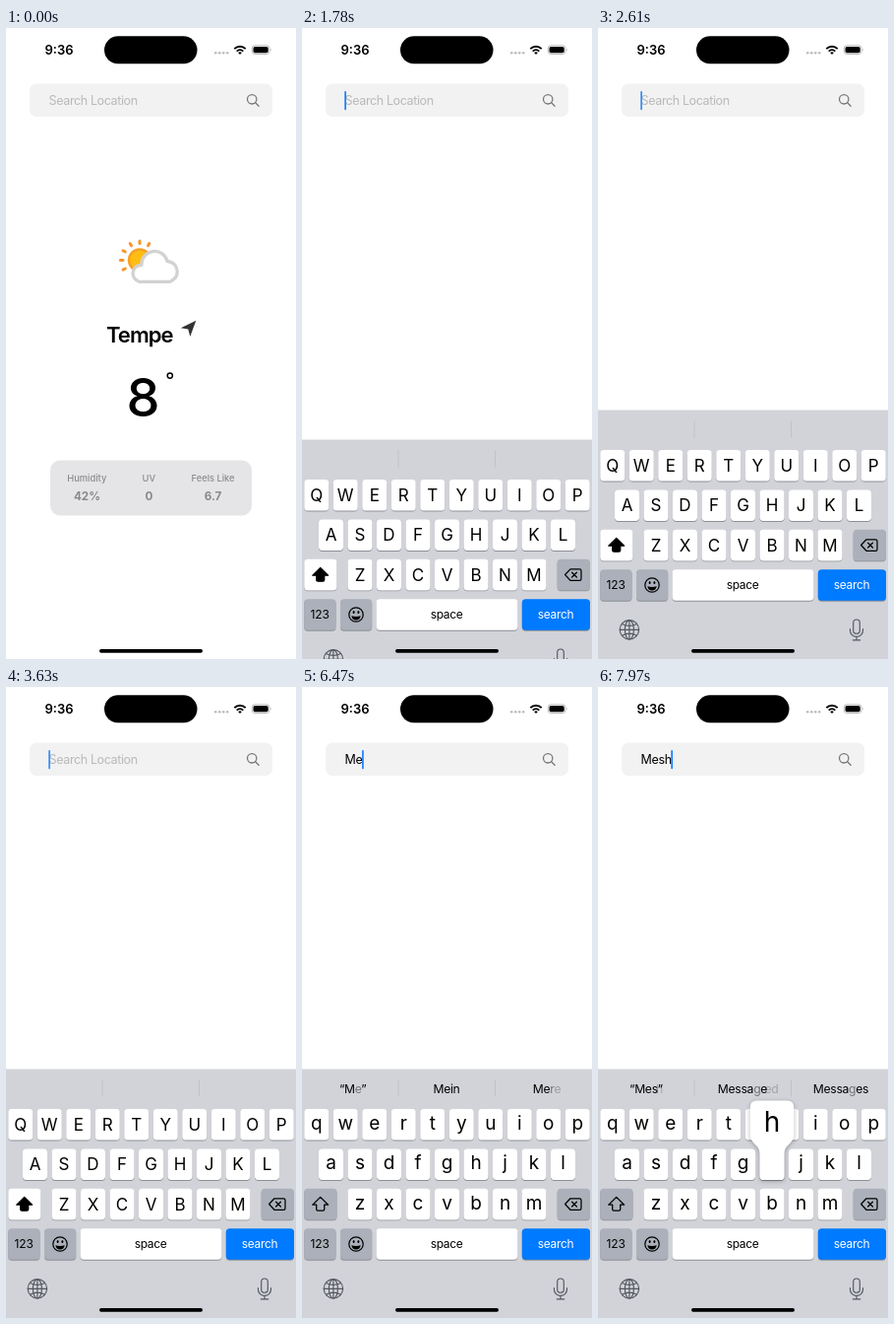
Recreate the animation shown at these times as an HTML page. Size 295 by 640 pixels, loop 8000 ms.

```html
<!DOCTYPE html>
<html lang="en">
<head>
<meta charset="utf-8">
<title>Weather search</title>
<style>
  html, body { margin: 0; width: 100%; height: 100%; overflow: hidden; background: #fff; }
  svg { display: block; width: 295px; height: 640px; font-family: Inter, Roboto, sans-serif; }
  text { white-space: pre; }
  .mid { text-anchor: middle; }
  .field { font-size: 12.5px; letter-spacing: -.38px; }
  .label { font-size: 9.3px; font-weight: 500; fill: #8b8b8e; }
  .value { font-size: 11.7px; font-weight: 700; fill: #89898c; }
  .small { font-size: 12px; letter-spacing: -.35px; }
  .word { font-size: 12.2px; letter-spacing: -.3px; }
  .line { fill: none; stroke: #000; stroke-linecap: round; stroke-linejoin: round; }
  .util { stroke: #55585e; stroke-width: 1.15; }
  #balloon path { filter: drop-shadow(0 1px 2px rgba(0,0,0,.3)); }
</style>
</head>
<body>
<svg viewBox="0 0 295 640">
  <rect width="295" height="640" fill="#fff"/>

  <!-- status bar -->
  <text class="mid" x="54" y="26.8" font-size="13" font-weight="600">9:36</text>
  <rect x="100" y="8.3" width="94.5" height="28" rx="14"/>
  <g fill="#bcbcbe">
    <circle cx="213.2" cy="25.2" r="1.3"/><circle cx="217.2" cy="25.2" r="1.3"/>
    <circle cx="221.2" cy="25.2" r="1.3"/><circle cx="225.2" cy="25.2" r="1.3"/>
  </g>
  <g class="line" stroke-width="1.9" style="stroke-linecap:butt">
    <path d="M232.3 21.1a8.2 8.2 0 0 1 11.4 0M234.7 23.6a4.8 4.8 0 0 1 6.6 0"/>
  </g>
  <path d="M236.2 25.1a2.6 2.6 0 0 1 3.6 0l-1.8 1.9z"/>
  <rect x="250.3" y="17.8" width="17.6" height="8.6" rx="2.7" fill="none" stroke="#a5a5a5" stroke-width=".8"/>
  <rect x="251.5" y="19" width="15.2" height="6.2" rx="1.7"/>
  <path d="M269 20.6q1.4 1.5 0 3z" fill="#a5a5a5"/>

  <!-- search field -->
  <rect x="24" y="56.5" width="247" height="33.5" rx="7" fill="#f2f2f2"/>
  <text class="field" id="hint" x="43.6" y="78.3" fill="#b9b9bc">Search Location</text>
  <text class="field" id="typed" x="43.6" y="78.3"></text>
  <rect id="caret" y="64" width="1.6" height="19.3" rx=".8" fill="#067aff"/>
  <g class="line" style="stroke:#77777a" stroke-width="1.3">
    <circle cx="250.2" cy="72.3" r="4.7"/><path d="M253.7 75.8l3.4 3.5"/>
  </g>

  <!-- current weather -->
  <g id="weather">
    <g id="rays" class="line" style="stroke:#f8952b" stroke-width="3"></g>
    <circle cx="136" cy="235.5" r="11" fill="#ffbd14" stroke="#f8a024" stroke-width="2.4"/>
    <path d="M135.5 257.3A8.65 8.65 0 0 1 138 240.3A13.2 13.2 0 0 1 164 236.5A10.6 10.6 0 0 1 166.5 257.3Z"
      fill="#fff" stroke="#d2d2d3" stroke-width="3.3" stroke-linejoin="round"/>
    <text x="102" y="318.7" font-size="22" font-weight="600" letter-spacing="-.95">Tempe</text>
    <path d="M193.3 296.8L177.8 304.2l7.5 1.3 2 7.4z" fill="#333336"/>
    <text class="mid" x="139.5" y="394.3" font-size="54" font-weight="500">8</text>
    <circle cx="166.8" cy="352.6" r="2.6" fill="none" stroke="#000" stroke-width="1.5"/>
    <rect x="45" y="438.5" width="205" height="56" rx="10" fill="#e5e5e7"/>
    <g class="mid">
      <text class="label" x="82.3" y="460">Humidity</text>
      <text class="label" x="145.3" y="460">UV</text>
      <text class="label" x="210.6" y="460">Feels Like</text>
      <text class="value" x="82.5" y="479.3">42%</text>
      <text class="value" x="145.4" y="479.3">0</text>
      <text class="value" x="210.6" y="479.3">6.7</text>
    </g>
  </g>

  <!-- keyboard -->
  <g id="board">
    <rect y="387.5" width="295" height="320" fill="#d1d3d9"/>
    <path d="M98 398.5v17M196.5 398.5v17" stroke="#bfc1c7" stroke-width=".9"/>
    <g id="words"></g>
    <g id="keys"></g>
    <path id="shift" class="line" stroke-width="1.3"
      d="M18.7 517.4L26.6 525.2H22.7V529.8Q22.7 531.2 21.3 531.2H16.1Q14.7 531.2 14.7 529.8V525.2H10.8Z"/>
    <g class="line" stroke-width="1.25">
      <path d="M273 518.8H282.4Q284 518.8 284 520.4V528.7Q284 530.3 282.4 530.3H273L267.6 524.5Z"/>
      <path d="M274.6 522.2l4.8 4.8M279.4 522.2l-4.8 4.8"/>
      <circle cx="55" cy="565" r="7.2"/>
    </g>
    <path d="M50.3 566.2Q55 567.6 59.7 566.2Q59 570.4 55 570.4Q51 570.4 50.3 566.2Z"/>
    <ellipse cx="52.6" cy="562.6" rx="1" ry="1.5"/><ellipse cx="57.4" cy="562.6" rx="1" ry="1.5"/>
    <g class="mid">
      <text class="small" x="18.2" y="569.3" style="letter-spacing:0">123</text>
      <text class="small" x="147" y="568.6">space</text>
      <text class="small" x="258" y="568.6" fill="#fff">search</text>
    </g>
    <g class="line util">
      <circle cx="31.9" cy="610.3" r="9.7"/><ellipse cx="31.9" cy="610.3" rx="4.5" ry="9.7"/>
      <path d="M31.9 600.6v19.4M22.2 610.3h19.4M24.5 604.4q7.4 4 14.8 0M24.5 616.2q7.4 -4 14.8 0"/>
      <rect x="259.7" y="600" width="6.6" height="14.2" rx="3.3"/>
      <path d="M256.5 609.5v1.8a6.5 6.1 0 0 0 13 0v-1.8M263 617.5v3.2M259.3 620.8h7.4"/>
    </g>
    <g id="balloon"><path fill="#fff"/><text class="mid" font-size="28"></text></g>
  </g>
  <rect x="95" y="630" width="105" height="3.7" rx="1.85"/>
</svg>

<script>
const LOOP = 8000;
const PITCH = 29.5, KEY_W = 25, KEY_H = 31.6, TOP = 428, ROW = 40.4;
const $ = id => document.getElementById(id);

function add(parent, tag, attrs, text = '') {
  const el = document.createElementNS('http://www.w3.org/2000/svg', tag);
  for (const k in attrs) el.setAttribute(k, attrs[k]);
  el.textContent = text;
  parent.appendChild(el);
  return el;
}

function cap(x, y, w, fill) {
  const box = { x, width: w, height: KEY_H, rx: 3.7 };
  add($('keys'), 'rect', { ...box, y: y + 0.9, fill: '#8d9095' });
  return add($('keys'), 'rect', { ...box, y, fill });
}

// Sun rays
for (let a = 150; a <= 300; a += 30) {
  const r = a * Math.PI / 180, c = Math.cos(r), s = Math.sin(r);
  add($('rays'), 'path', {
    d: `M${136 + 17 * c} ${235.5 + 17 * s}L${136 + 19.6 * c} ${235.5 + 19.6 * s}`
  });
}

// Letter keys
const letters = {};
['qwertyuiop', 'asdfghjkl', 'zxcvbnm'].forEach((row, r) => {
  [...row].forEach((ch, i) => {
    const x = 2.25 + [0, 0.5, 1.5][r] * PITCH + i * PITCH, y = TOP + r * ROW;
    cap(x, y, KEY_W, '#fff');
    const cx = x + KEY_W / 2;
    letters[ch] = { cx, y, el: add($('keys'), 'text', { x: cx, class: 'mid' }) };
  });
});

// Function keys
const GREY = '#abb0ba', y3 = TOP + 2 * ROW, y4 = TOP + 3 * ROW;
const shiftKey = cap(2.25, y3, 33.2, GREY);
cap(259.7, y3, 33.2, GREY);
cap(2.25, y4, 32.2, GREY);
cap(39, y4, 32.2, GREY);
cap(75.5, y4, 144, '#fff');
cap(223.8, y4, 69.2, '#007aff');

const wordEls = [49, 147, 247].map(x => add($('words'), 'text', { x, y: 411.5, class: 'word mid' }));
const ghosts = [[59, 'h'], [169.5, 'ed']].map(([x, s]) =>
  add($('words'), 'text', { x, y: 411.5, class: 'word', opacity: 0.22 }, s));

// Parts between ~ marks fade in
const entries = [
  { at: 0, text: '', words: ['', '', ''] },
  { at: 5630, text: 'M', words: ['~“M”~', '~Mein~', '~Me~'] },
  { at: 6470, text: 'Me', words: ['“M~e~”', 'Mein', 'Me~r~~e~'], slide: [2.6, 0, 2] },
  { at: 6940, text: 'Mes', words: ['“Me~s~”', 'Me~ssage~', 'Me~ssages~'] },
  { at: 7970, text: 'Mesh', words: ['“Mes”', 'Messa~g~e', 'Messa~g~es'] }
];
const presses = [['m', 5400, 5630], ['e', 6360, 6470], ['s', 6830, 7050], ['h', 7860, LOOP]];
const riseTicks = [1570, 1680, 1780, 1880, 2000, 2130, 2250];

// Critically damped spring, sampled on the ticks
function boardOffset(t) {
  const tick = riseTicks.filter(k => k <= t).pop();
  if (!tick) return 260;
  if (tick === 2250) return 0;
  const x = 0.0161 * (tick - 1552);
  return 252.5 * (1 + x) * Math.exp(-x);
}

function caretAlpha(t) {
  if (t < 1570) return 0;
  if (t < 2130 || t >= 5400) return 1;
  const p = (t - 2130) % 1020;
  if (p < 120) return 0.5;
  if (p < 360) return 0;
  return p < 480 ? 0.5 : 0.88;
}

function setWord(el, mark, alpha, dx) {
  el.textContent = '';
  mark.split('~').forEach((part, i) => {
    if (!part) return;
    const a = i % 2 ? Math.max(0, alpha - (i > 2 && alpha < 1 ? 0.2 : 0)) : 1;
    add(el, 'tspan', { 'fill-opacity': a }, part);
  });
  el.setAttribute('transform', `translate(${dx} 0)`);
}

function balloonPath(cx, y) {
  return `M${cx - 22.3} ${y - 42}q0 -7 7 -7h30.6q7 0 7 7v28c0 9 -9.8 9 -9.8 19` +
    `v22.9q0 3.7 -3.7 3.7h-17.6q-3.7 0 -3.7 -3.7v-22.9c0 -10 -9.8 -10 -9.8 -19z`;
}

let lastKey = '';

function draw(t) {
  const entry = entries.filter(e => e.at <= t).pop();
  const press = presses.find(p => t >= p[1] && t < p[2]);
  const step = Math.floor((t - entry.at) / 110);
  $('board').setAttribute('transform', `translate(0 ${boardOffset(t)})`);
  $('caret').setAttribute('opacity', caretAlpha(t));

  const key = entry.text + '|' + (press ? press[0] : '') + '|' + Math.min(step, 4) + '|' + (t < 1570);
  if (key === lastKey) return;
  lastKey = key;

  const upper = !entry.text;
  const label = ch => upper ? ch.toUpperCase() : ch;
  $('weather').style.display = t < 1570 ? '' : 'none';
  $('hint').style.display = upper ? '' : 'none';
  $('typed').textContent = entry.text;
  $('caret').setAttribute('x', upper ? 43.3 : 43.3 + $('typed').getComputedTextLength());

  for (const ch in letters) {
    const k = letters[ch];
    k.el.textContent = press && press[0] === ch ? '' : label(ch);
    k.el.setAttribute('font-size', upper ? 17 : 19);
    k.el.setAttribute('y', k.y + (upper ? 22 : 20.8));
  }
  shiftKey.setAttribute('fill', upper ? '#fff' : GREY);
  $('shift').style.fill = upper ? '#000' : 'none';

  const alpha = Math.min(1, 0.45 + step * 0.25);
  wordEls.forEach((el, i) =>
    setWord(el, entry.words[i], alpha, (entry.slide ? entry.slide[i] : 0) * (1 - alpha) / 0.55));
  ghosts.forEach(g => g.style.display = entry.text === 'Mesh' ? '' : 'none');

  $('balloon').style.display = press ? '' : 'none';
  if (press) {
    const { cx, y } = letters[press[0]];
    const [shape, text] = $('balloon').children;
    shape.setAttribute('d', balloonPath(cx, y));
    text.setAttribute('x', cx);
    text.setAttribute('y', y - 17.2);
    text.textContent = label(press[0]);
  }
}

const start = performance.now();
function frame() {
  draw((performance.now() - start) % LOOP);
  requestAnimationFrame(frame);
}
draw(0);
requestAnimationFrame(frame);
</script>
</body>
</html>
```
